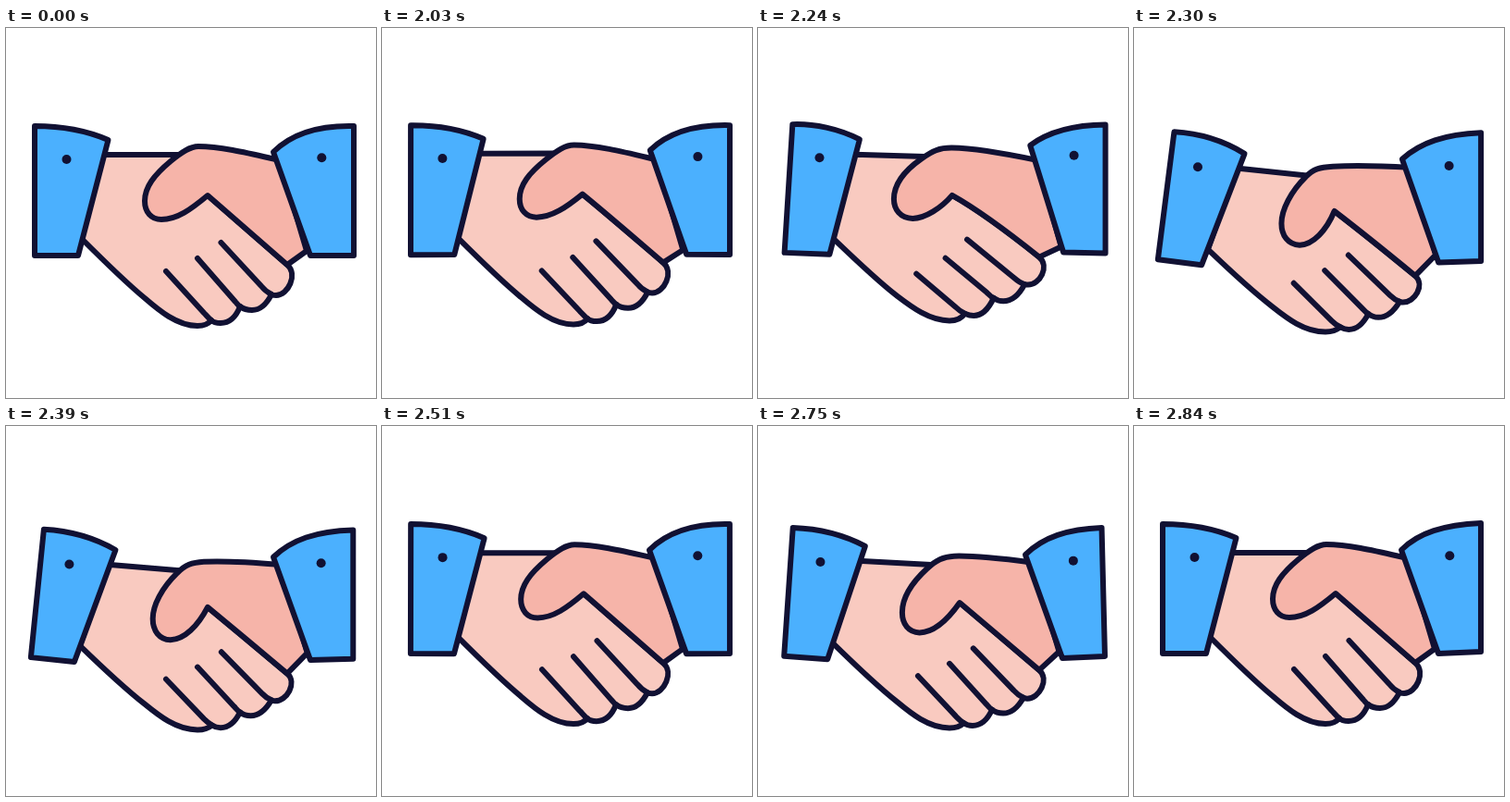
Recreate the animation shown at these times as an HTML page. Size 400 by 400 pixels, loop 2.9 s.

```html
<!DOCTYPE html>
<html lang="en">
<head>
<meta charset="utf-8">
<title>Handshake</title>
<style>
  html, body { margin: 0; width: 100%; height: 100%; overflow: hidden; background: #fff; }
  svg { display: block; width: 100vw; height: 100vh; }

  path {
    d: var(--rest);
    fill: none;
    stroke: #111133;
    stroke-width: 6;
    stroke-linecap: round;
    stroke-linejoin: round;
    animation: shake 2900ms cubic-bezier(.333, 0, .667, 1) infinite;
  }

  /* rest, up at 2167 ms, down, rest, down again, settled at 2833 ms */
  @keyframes shake {
    0%, 68.966% { d: var(--rest); }
    74.713% { d: var(--up); }
    80.46% { d: var(--down); }
    86.207% { d: var(--rest); }
    91.954% { d: var(--down2, var(--down)); }
    97.701%, 100% { d: var(--end, var(--rest)); }
  }

  .palm {
    fill: #f9cac0;
    --rest: path("M104,137 L187,137 L218,181 C247,206 275,231 304,256 C316,266 305,289 292,289 C290,289 288,289 287,288 C281,300 274,305 266,305 C261,305 257,304 253,301 C248,314 240,319 232,319 C228,319 224,318 222,316 C218,321 213,322 207,322 C185,322 165,305 150,292 C128,274 105,251 80,226 Z");
    --up: path("M99,124 L175,121 L204,166 C235,178 272,205 304,230 C316,240 306,261 293,261 C291,261 290,261 289,261 C283,274 275,280 266,280 C262,280 259,279 256,277 C250,291 242,298 234,298 C230,298 227,297 224,296 C221,303 214,306 207,306 C186,306 165,290 150,279 C128,262 105,239 80,215 Z");
    --down: path("M112,154.6 L188,163.7 L218,201.5 C247,225 275,248 304,272 C315,282 303,301 290,300.5 C289,300.5 288,300 287,299.5 C280,311 272,316.4 264,316.4 C260,316.4 256,315 253,312.5 C247,324 240,329 232,329 C229,329 226,328 223,326.3 C218,330 213,331 207,331 C184,331 165,316 150,304 C128,287 105,266 80,242 Z");
  }

  .fingers {
    --rest: path("M173,263 L214,308 C217,311 219,314 222,316 M207,249 L248,296 C250,298 251,300 253,301 M232.5,232 L276,279 C280,284 283,286 287,288");
    --up: path("M170,257 L214,289 C217,292 220,294 224,296 M199.5,237 L249,272 C251,274 253,276 256,277 M221,214 L276,253 C281,257 285,260 289,261");
    --down: path("M173,277.8 L214,320 C217,323 220,325 223,326.3 M207,265 L246,306 C248,308 250,311 253,312.5 M233,249 L277,293 C280,296 283,298 287,299.5");
  }

  .grip {
    fill: #f6b4a9;
    --rest: path("M208,128 C233,128 265,136 296,143 L325,241 L304,256 C275,231 247,206 218,181 C200,196 185,207 168,207 C157,207 150,199 150,187 C150,172 160,159 178,144 C190,134 199,128 208,128 Z");
    --up: path("M205,112 C233,114 265,124 304,136 L329,229 L304,230 C272,205 235,178 204,166 C190,173 170,181 157,181 C143,181 136,172 136,162 C136,145 150,134 168,125 C184,116 192,111 205,112 Z");
    --down: path("M216,153.9 C240,152 270,152 298,152.5 L326,247 L304,272 C275,248 247,225 218,201.5 C210,224 196,240 181.5,240.5 C169,240 162,230 162,216.5 C162,202 172,181 187.5,165 C195,156 202,155 216,153.9 Z");
  }

  .cuff { fill: #4bb0fe; }

  .left {
    --rest: path("M31,106 L31,246 L78,246 L110.5,121 C85,110 58,106 31,106 Z");
    --up: path("M32,97 L31,236.5 L81,235 L101.5,107 C80,98 52,94 32,97 Z");
    --down: path("M44.7,114 L25.3,251.7 L72.3,258.5 L121.5,139 C98,124 72,116 44.7,114 Z");
  }

  .right {
    --rest: path("M376,106 L376,246 L329,246 L289,134 C308,115 335,105 376,106 Z");
    --up: path("M376,97 L376,236 L331,233 L298,114 C318,102 345,96 376,97 Z");
    --down: path("M375,115 L375,253.8 L329,255.7 L289,144.7 C309,126 335,117 375,115 Z");
    --down2: path("M368,115.2 L375,254 L329,256 L289,144.5 C309,125 335,116 368,115.2 Z");
    --end: path("M375,105 L375,244 L329,246 L289,134 C308,115 335,107 375,105 Z");
  }

  .button { stroke-width: 10; }

  .button.left {
    --rest: path("M65.5,142 L65.5,142");
    --up: path("M64.3,131.7 L64.3,131.7");
    --down: path("M69.5,152.3 L69.5,152.3");
  }

  .button.right {
    --rest: path("M341.3,140.2 L341.3,140.2");
    --up: path("M342.5,128 L342.5,128");
    --down: path("M340.4,151.3 L340.4,151.3");
    --down2: var(--down);
    --end: var(--rest);
  }
</style>
</head>
<body>
<svg viewBox="0 0 400 400">
  <path class="palm"/>
  <path class="grip"/>
  <path class="fingers"/>
  <path class="cuff left"/>
  <path class="cuff right"/>
  <path class="button left"/>
  <path class="button right"/>
</svg>
</body>
</html>
```
